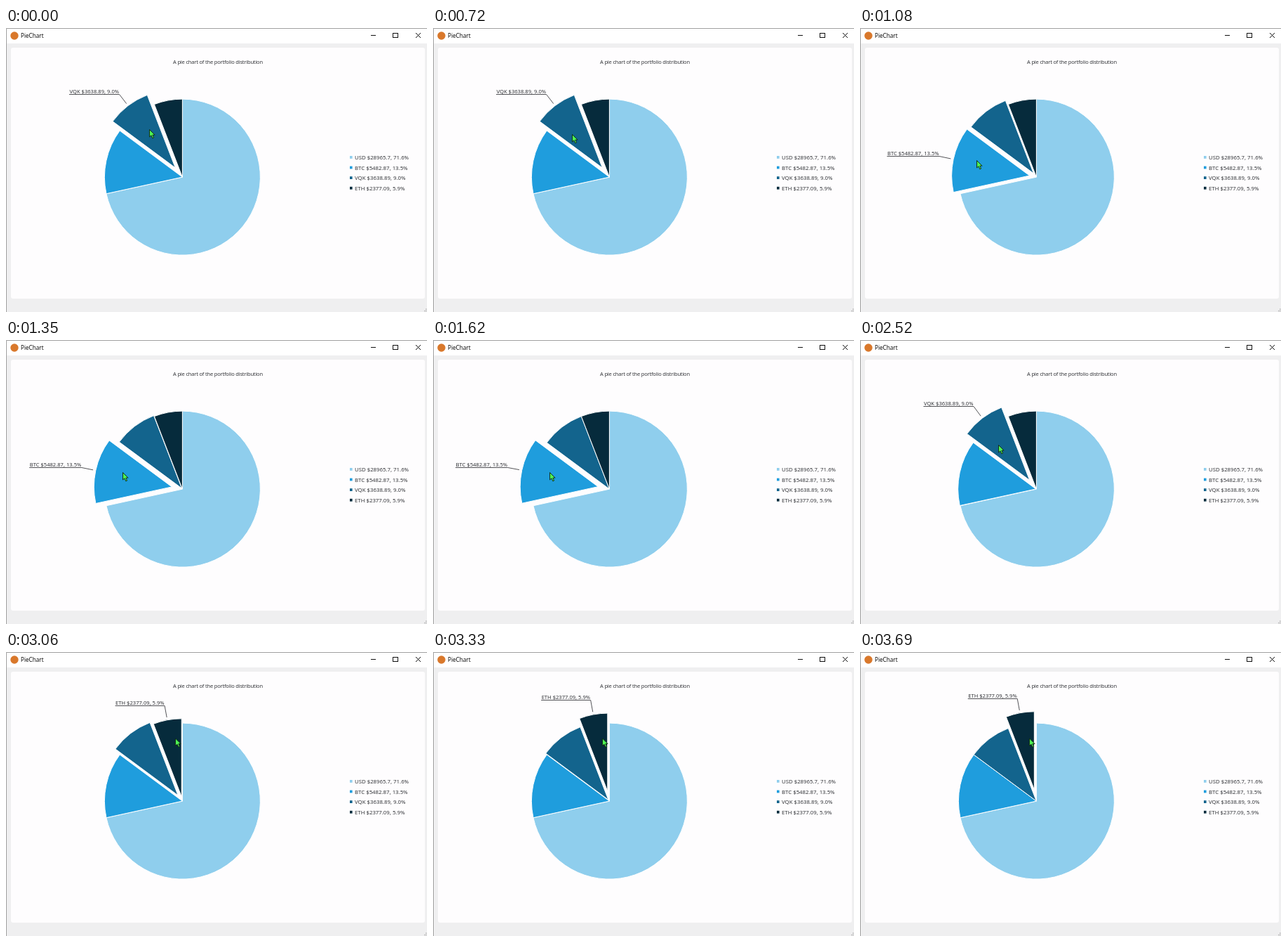
Animation of 600 by 404 pixels, one loop 3.78 s. Source, as an HTML page:

```html
<!DOCTYPE html>
<html lang="en">
<head>
<meta charset="utf-8">
<title>PieChart</title>
<style>
  html, body { margin: 0; width: 100%; height: 100%; overflow: hidden; background: #efeff0; }
  svg { display: block; width: 600px; height: 404px; }
  text { font-family: "Noto Sans", "Open Sans", sans-serif; fill: #35373b; }
  .caption { font: 8.2px "Open Sans", "Noto Sans", sans-serif; fill: #000; }
  .title { font-size: 7.5px; letter-spacing: -.19px; text-anchor: middle; }
  .legend text { font-size: 7.8px; }
  #label { font-size: 7.6px; text-anchor: end; }
  #arm { fill: none; stroke: #404044; stroke-width: .9; }
  #pie path { stroke: #fff; stroke-width: 1; stroke-linejoin: round; }
  .controls { fill: none; stroke: #111; stroke-width: 1; }
</style>
</head>
<body>
<svg viewBox="0 0 600 404">
  <rect width="600" height="404" fill="#efeff0"/>
  <rect width="600" height="22" fill="#fff"/>
  <path d="M.5 404V.5H600" fill="none" stroke="#a0a0a0"/>
  <circle cx="12" cy="11" r="5.7" fill="#d9782b"/>
  <text class="caption" x="21" y="14.3">PieChart</text>
  <g class="controls">
    <path d="M520 10.5h7"/>
    <rect x="551.5" y="7.5" width="7" height="6"/>
    <path d="M584 7l7 7m0-7l-7 7"/>
  </g>
  <rect x="7" y="28" width="590" height="357" rx="3" fill="#fefdfe"/>
  <path d="M598 400h1.5M596 402.5h1.5M598 402.5h1.5" stroke="#b4b4b4" stroke-width="1.4"/>
  <text class="title" x="302" y="50.5">A pie chart of the portfolio distribution</text>
  <g id="pie"></g>
  <g class="legend" id="legend"></g>
  <path id="arm"/>
  <text id="label"></text>
  <path id="cursor" d="M.5 .5V10.9L3 8.8L4.8 12.8L6.6 12L4.9 8.1H8.1Z"
        fill="#4ef455" stroke="#10240f" stroke-width=".9" stroke-linejoin="round"/>
</svg>
<script>
const LOOP = 3780, TICK = 90, HOLD = 720, EASE_MS = 1000;
const CX = 251.4, CY = 212.1, R = 111, EXPLODE = R * 0.15, ARM = R * 0.15, GAP = 3.8;

const slices = [
  { name: 'USD', value: 28965.7, color: '#8fceed' },
  { name: 'BTC', value: 5482.87, color: '#1f9ddd' },
  { name: 'VQK', value: 3638.89, color: '#13648d' },
  { name: 'ETH', value: 2377.09, color: '#062b3c' }
];
// [time, hovered slice]
const hovers = [[-EASE_MS, 2], [875, 1], [1980, 2], [2947, 3]];
// [time, x, y]
const mouse = [
  [0, 204, 144], [660, 204, 144], [1040, 166, 188], [1750, 166, 188],
  [2100, 197, 149], [2750, 197, 149], [3020, 241, 122.5], [LOOP, 241, 122.5]
];

const $ = id => document.getElementById(id);
const add = (parent, tag, attrs) => {
  const el = document.createElementNS('http://www.w3.org/2000/svg', tag);
  for (const key in attrs) el.setAttribute(key, attrs[key]);
  return parent.appendChild(el);
};
const polar = (angle, r) => [Math.sin(angle) * r, -Math.cos(angle) * r];
const outQuart = t => 1 - (1 - Math.min(1, Math.max(0, t))) ** 4;

const total = slices.reduce((sum, s) => sum + s.value, 0);
let angle = 0;
slices.forEach((s, i) => {
  const share = s.value / total, end = angle + share * 2 * Math.PI;
  s.mid = (angle + end) / 2;
  s.text = `${s.name} $${s.value}, ${(share * 100).toFixed(1)}%`;
  s.el = add($('pie'), 'path', {
    fill: s.color,
    d: `M0 0L${polar(angle, R)}A${R} ${R} 0 ${share > 0.5 ? 1 : 0} 1 ${polar(end, R)}Z`
  });
  angle = end;
  const y = 184 + i * 14.6;
  add($('legend'), 'rect', { x: 490, y: y - 2, width: 3.6, height: 3.8, fill: s.color });
  add($('legend'), 'text', { x: 497, y: y + 2.9 }).textContent = s.text;
});

function mouseAt(t) {
  const i = mouse.findIndex(p => p[0] > t);
  const [t0, x0, y0] = mouse[i - 1], [t1, x1, y1] = mouse[i];
  const k = (t - t0) / (t1 - t0);
  return [x0 + (x1 - x0) * k, y0 + (y1 - y0) * k];
}

function drawLabel(s, out) {
  const point = r => {
    const [x, y] = polar(s.mid, out + r);
    return [CX + x, CY + y];
  };
  const [ex, ey] = point(R + GAP + ARM), line = Math.floor(ey) + 0.5;
  const label = $('label');
  label.textContent = s.text;
  label.setAttribute('x', ex - 0.5);
  label.setAttribute('y', line - 2);
  const width = label.getComputedTextLength() + 1;
  $('arm').setAttribute('d', `M${point(R + GAP)}L${ex} ${line}h${-width}`);
}

function draw(t) {
  let n = hovers.length - 1;
  while (hovers[n][0] > t) n--;
  const [start, active] = hovers[n];
  const previous = n ? hovers[n - 1][1] : -1;
  const k = outQuart((t - start) / EASE_MS);
  slices.forEach((s, i) => {
    const out = EXPLODE * (i === active ? k : i === previous ? 1 - k : 0);
    const [x, y] = polar(s.mid, out);
    s.el.setAttribute('transform', `translate(${CX + x} ${CY + y})`);
    if (i === active) drawLabel(s, out);
  });
  $('cursor').setAttribute('transform', `translate(${mouseAt(t)})`);
}

// The picture updates in steps, after an opening hold.
function frame() {
  const t = performance.now() % LOOP;
  draw(t < HOLD ? 0 : Math.floor(t / TICK) * TICK);
  requestAnimationFrame(frame);
}
frame();
</script>
</body>
</html>
```
